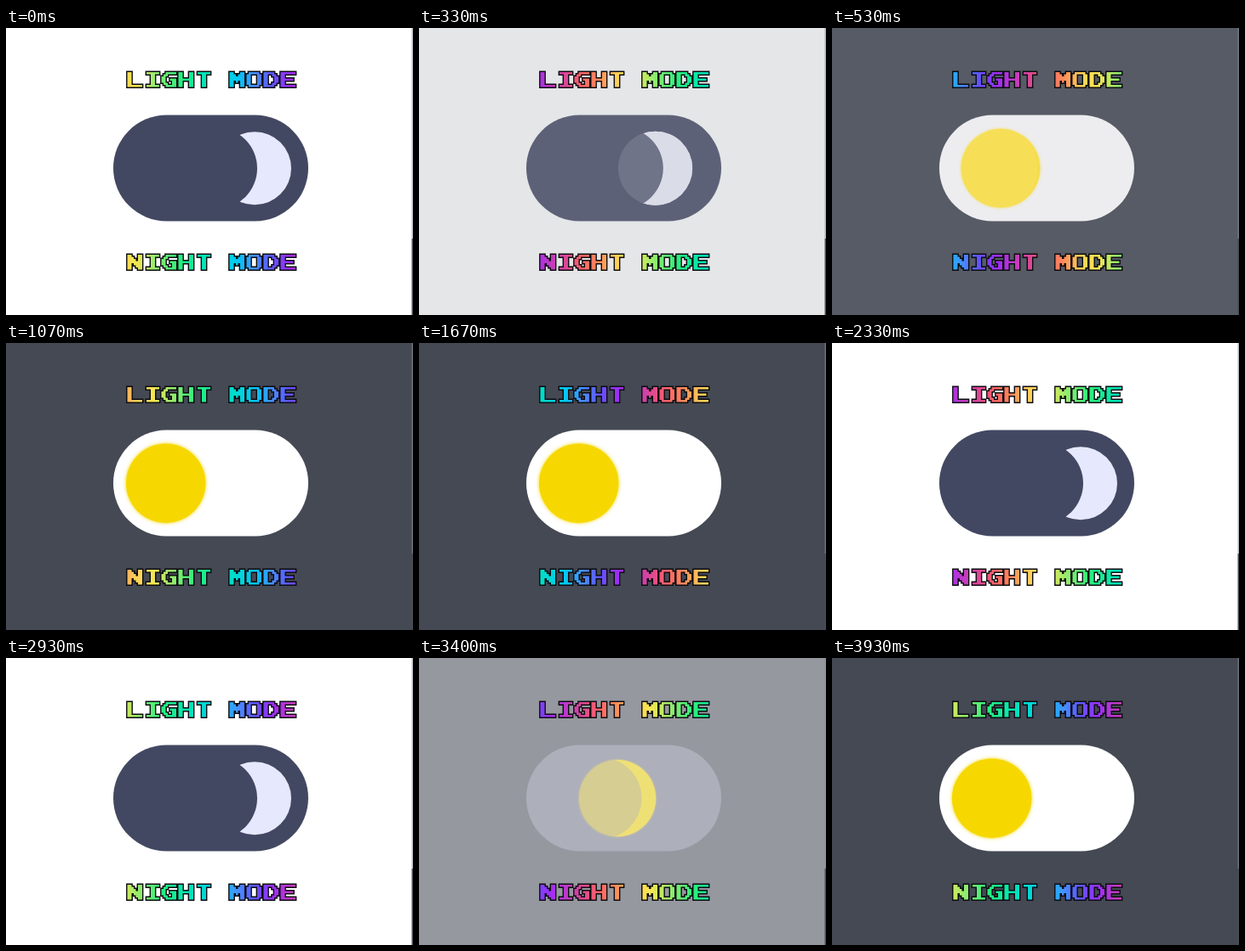
An HTML page with a canvas that plays this animation: 478x338 px, repeating every 3.99 s.

```html
<!DOCTYPE html>
<html lang="en">
<head>
<meta charset="utf-8">
<title>Light and night mode switch</title>
<style>
  html, body { margin: 0; width: 100%; height: 100%; overflow: hidden; }
  canvas { display: block; }
  /* Selectable text under the pixel lettering */
  p { position: absolute; left: 142px; margin: 0; color: transparent; font: 20px/18px "DejaVu Sans Mono", monospace; white-space: nowrap; }
</style>
</head>
<body>
<canvas width="478" height="338"></canvas>
<p style="top:52px">LIGHT MODE</p>
<p style="top:267px">NIGHT MODE</p>
<script>
const ctx = document.querySelector('canvas').getContext('2d');
const LOOP = 3990, FPS = 15, CELL = 20, DOT = 2.5, LEFT = 142.5;

// Seven rows per letter, two hex digits per row
const GLYPHS = {
  L: '6060606060607f', I: '3f0c0c0c0c0c3f', G: '1f30606763331f',
  H: '6363637f636363', T: '3f0c0c0c0c0c0c', M: '63777f7f6b6363',
  O: '3e63636363633e', D: '7c66636363667c', E: '7f60607e60607f',
  N: '63737b7f6f6763'
};

// Rainbow stops, placed in letter cells; the pattern repeats every 15 cells
const RAINBOW = [
  [0, '#f8e650'], [1.1, '#9bec6c'], [2.6, '#28f07d'], [4, '#00e6b4'],
  [6, '#00c8f5'], [7, '#4690ff'], [8, '#5f55ff'], [9.1, '#a02cf8'],
  [11, '#dc4696'], [12, '#ff6464'], [13, '#ff8c5a'], [14, '#ffd05a']
];
const REPEAT = 15;

// Colours from day to night
const BACK = [[68, 73, 84], [255, 255, 255]];
const PILL = [[255, 255, 255], [67, 72, 98]];
const KNOB = [[246, 216, 0], [246, 221, 75], [239, 224, 120], [203, 206, 203], [230, 232, 253]];
const KNOB_AT = [0, 0.1, 0.45, 0.69, 1];

const mix = (a, b, k) => a + (b - a) * k;
const blend = ([a, b], k) => `rgb(${a.map((v, i) => Math.round(mix(v, b[i], k)))})`;

function knobColor(p) {
  let i = 0;
  while (i < KNOB.length - 2 && p > KNOB_AT[i + 1]) i++;
  return blend([KNOB[i], KNOB[i + 1]], (p - KNOB_AT[i]) / (KNOB_AT[i + 1] - KNOB_AT[i]));
}

// cubic-bezier(.25, .1, .25, 1)
function ease(x) {
  if (x <= 0) return 0;
  if (x >= 1) return 1;
  const bezier = (s, a, b) => 3 * (1 - s) ** 2 * s * a + 3 * (1 - s) * s * s * b + s ** 3;
  let lo = 0, hi = 1;
  for (let i = 0; i < 20; i++) {
    const mid = (lo + hi) / 2;
    if (bezier(mid, 0.25, 0.25) < x) lo = mid; else hi = mid;
  }
  return bezier(lo, 0.1, 1);
}

// 1 = night, 0 = day
const nightness = t => {
  const toggle = start => ease((t - start) / 0.4);
  return 1 - toggle(0.283) + toggle(1.838) - toggle(3.269);
};

function wordPath(text, y, grow) {
  const path = new Path2D(), size = DOT + 2 * grow;
  [...text].forEach((ch, n) => {
    if (!GLYPHS[ch]) return;
    for (let row = 0; row < 7; row++) {
      const bits = parseInt(GLYPHS[ch].slice(row * 2, row * 2 + 2), 16);
      for (let col = 0; col < 7; col++) {
        if (bits >> (6 - col) & 1) {
          path.rect(LEFT + n * CELL + col * DOT - grow, y + row * DOT - grow, size, size);
        }
      }
    }
  });
  return path;
}

const words = [...document.querySelectorAll('p')].map(p => ({
  edge: wordPath(p.textContent, p.offsetTop, 1.4),
  face: wordPath(p.textContent, p.offsetTop, 0)
}));

function rainbow(t) {
  const span = REPEAT * CELL, x = 152 - span + span * (t % 1);
  const g = ctx.createLinearGradient(x, 0, x + 2 * span, 0);
  for (const turn of [0, 1]) {
    for (const [at, color] of RAINBOW) g.addColorStop((at / REPEAT + turn) / 2, color);
  }
  g.addColorStop(1, RAINBOW[0][1]);
  return g;
}

function disc(x, y, r) {
  ctx.beginPath();
  ctx.arc(x, y, r, 0, 2 * Math.PI);
}

function drawSwitch(p) {
  const pill = blend(PILL, p);
  ctx.fillStyle = pill;
  ctx.beginPath();
  ctx.roundRect(126, 102.6, 229, 124.8, 62.4);
  ctx.fill();

  const x = mix(187.7, 292, p), y = 165.2;
  ctx.save();
  ctx.fillStyle = ctx.shadowColor = knobColor(p);
  ctx.shadowBlur = 4 * (1 - p);
  disc(x, y, mix(46.7, 43, p));
  ctx.fill();

  // The moon's shaded part stays inside the knob
  ctx.shadowBlur = 0;
  disc(x, y, mix(47.2, 43.8, p));
  ctx.clip();
  ctx.globalAlpha = p ** 1.1;
  ctx.fillStyle = pill;
  disc(x - 45 * p, y, 48);
  ctx.fill();
  ctx.restore();
}

function draw(t) {
  const p = nightness(t);
  ctx.fillStyle = blend(BACK, p);
  ctx.fillRect(0, 0, 478, 338);
  ctx.fillStyle = 'rgba(136, 138, 148, .6)';
  ctx.fillRect(476.5, 0, 1.5, 248);
  ctx.fillStyle = '#4a4c54';
  ctx.fillRect(476.5, 248, 1.5, 90);
  drawSwitch(p);

  const colors = rainbow(t);
  for (const { edge, face } of words) {
    ctx.fillStyle = '#0c0c10';
    ctx.fill(edge);
    ctx.fillStyle = colors;
    ctx.fill(face);
  }
}

const begin = performance.now();
function tick() {
  const ms = (performance.now() - begin) % LOOP;
  draw(Math.floor((ms + 4.9) * FPS / 1000) / FPS);
  requestAnimationFrame(tick);
}
tick();
</script>
</body>
</html>
```
